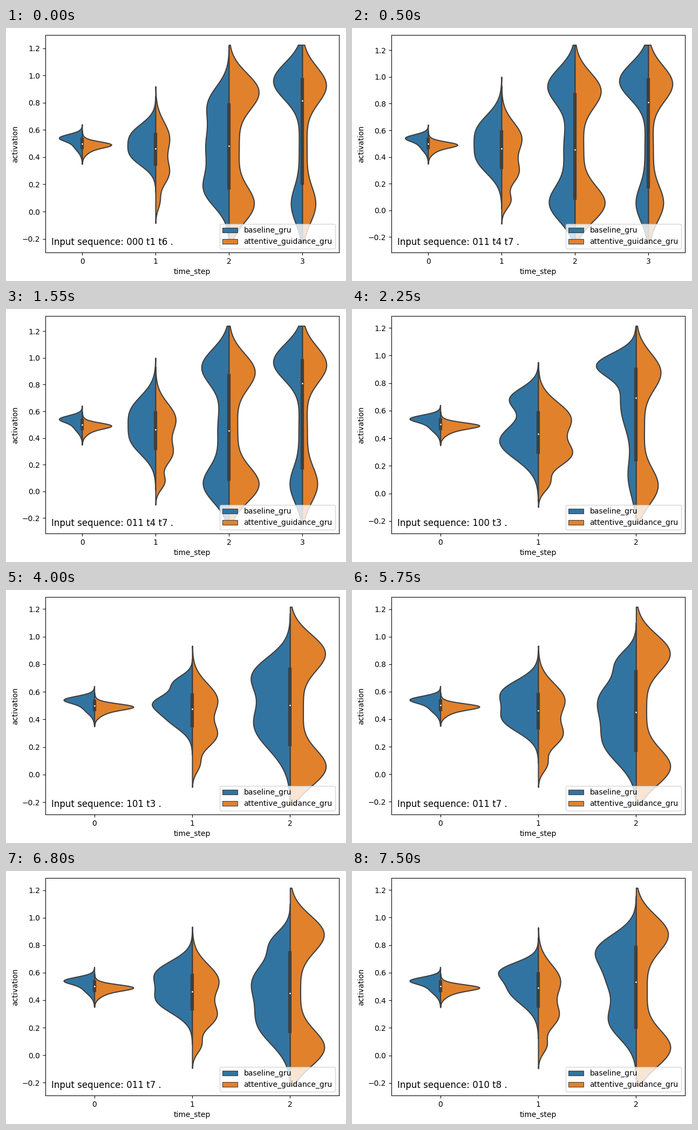
Animation, 630 px wide and 470 px high, one loop 8000 ms. Source, as a matplotlib script:

```python
import matplotlib.pyplot as plt
import numpy as np
from matplotlib.animation import FuncAnimation
from matplotlib.patches import Patch

W, H, DPI = 630, 470, 100
LEFT, RIGHT, TOP, BOTTOM = 73, 617, 13, 417
BLUE, ORANGE, GRAY = "#3274a1", "#e1812c", "#3f3f3f"
HALF_WIDTH = 0.4
INTERVAL, FRAMES = 250, 32

# A violin half is a sum of bell curves: (center, spread, height), height 1 = full width.
# At time step 0 both models look the same for every input.
START = ([(0.545, 0.025, 0.6), (0.495, 0.048, 0.3)],
         [(0.493, 0.021, 0.68), (0.472, 0.04, 0.36)])


def drifting(upper, lower, foot):
    """Half of a violin that begins to sink from the middle."""
    return [(0.54, 0.12, upper), (0.28, 0.09, lower), (0.07, 0.057, foot)]


def split(high, middle, low, top=0.885):
    """Half of a violin with most activations near one or near zero."""
    return [(top, 0.135, high), (0.47, 0.21, middle), (0.05, 0.135, low)]


# (sequence, lowest and highest activation, violins as (left, right))
SCENES = [
    ("000 t1 t6", (-0.228, 1.225), [
        START,
        ([(0.565, 0.085, 0.76), (0.41, 0.08, 0.72)], drifting(0.47, 0.42, 0.12)),
        ([(0.81, 0.125, 0.58), (0.48, 0.18, 0.76), (0.15, 0.125, 0.72)],
         split(0.97, 0.33, 0.81)),
        (split(0.98, 0.11, 0.37, top=0.96), split(0.8, 0.15, 0.43, top=0.93)),
    ]),
    ("011 t4 t7", (-0.241, 1.2395), [
        START,
        ([(0.6, 0.12, 0.8), (0.375, 0.11, 0.72)], drifting(0.68, 0.52, 0.28)),
        (split(0.9, 0.38, 0.83, top=0.935), split(0.85, 0.28, 0.98, top=0.9)),
        (split(0.98, 0.12, 0.41, top=0.97), split(0.81, 0.16, 0.49, top=0.95)),
    ]),
    ("100 t3", (-0.219, 1.215), [
        START,
        ([(0.69, 0.08, 0.68), (0.38, 0.13, 0.99)], drifting(0.83, 0.78, 0.25)),
        ([(0.935, 0.085, 0.87), (0.65, 0.2, 0.4), (0.12, 0.14, 0.2)],
         split(0.6, 0.2, 0.53)),
    ]),
    ("101 t3", (-0.217, 1.215), [
        START,
        ([(0.665, 0.055, 0.45), (0.53, 0.06, 0.7), (0.42, 0.085, 0.62)],
         drifting(0.64, 0.57, 0.16)),
        ([(0.73, 0.13, 0.86), (0.365, 0.18, 0.92)], split(0.85, 0.32, 0.87)),
    ]),
    ("011 t7", (-0.222, 1.218), [
        START,
        ([(0.6, 0.09, 0.86), (0.4, 0.095, 0.86)], drifting(0.67, 0.56, 0.2)),
        ([(0.83, 0.085, 0.36), (0.55, 0.15, 0.9), (0.225, 0.15, 0.77)],
         split(0.83, 0.25, 0.84)),
    ]),
    ("010 t8", (-0.219, 1.215), [
        START,
        ([(0.622, 0.06, 0.62), (0.485, 0.11, 0.76)], drifting(0.56, 0.47, 0.19)),
        ([(0.77, 0.115, 0.93), (0.54, 0.12, 0.6), (0.25, 0.13, 0.68)],
         split(0.78, 0.265, 0.84)),
    ]),
]

fig = plt.figure(figsize=(W / DPI, H / DPI), dpi=DPI, facecolor="white")
ax = fig.add_axes([LEFT / W, 1 - BOTTOM / H, (RIGHT - LEFT) / W, (BOTTOM - TOP) / H])
handles = [Patch(facecolor=color, edgecolor=GRAY, linewidth=0.75, label=label)
           for color, label in ((BLUE, "baseline_gru"), (ORANGE, "attentive_guidance_gru"))]


def density(bumps, y):
    return sum(h * np.exp(-((y - c) / s) ** 2 / 2) for c, s, h in bumps)


def draw_violin(x, halves, y):
    mass = 0
    for bumps, side, color in zip(halves, (-1, 1), (BLUE, ORANGE)):
        width = density(bumps, y)
        mass = mass + width / width.sum()
        seen = width > 0.003
        ax.fill_betweenx(y[seen], x, x + side * HALF_WIDTH * width[seen],
                         facecolor=color, edgecolor=GRAY, linewidth=1.5)
    # The box spans the quartiles of both halves together.
    share = np.cumsum(mass) / mass.sum()
    lower, median, upper = np.interp([0.25, 0.5, 0.75], share, y)
    ax.plot([x, x], [lower, upper], color=GRAY, linewidth=4.5)
    ax.scatter(x, median, s=9, color="white", edgecolor=GRAY, linewidth=1, zorder=3)


def draw(frame):
    # The plot changes every seven ticks, the first one after two.
    sequence, (low, high), violins = SCENES[(frame + 5) // 7]
    ax.clear()
    y = np.linspace(low, high, 600)
    for x, halves in enumerate(violins):
        draw_violin(x, halves, y)
    margin = 0.05 * (high - low)
    ax.set_xticks(range(len(violins)))
    ax.set_yticks(np.arange(-1, 7) / 5)
    ax.set_xlim(-0.5, len(violins) - 0.5)
    ax.set_ylim(low - margin, high + margin)
    ax.set_xlabel("time_step")
    ax.set_ylabel("activation")
    ax.text(0.02, 0.035, f"Input sequence: {sequence} .", fontsize=12, transform=ax.transAxes)
    ax.legend(handles=handles, loc="lower right")
    return []


anim = FuncAnimation(fig, draw, frames=FRAMES, init_func=lambda: [], interval=INTERVAL,
                     repeat=True, repeat_delay=0)
plt.show()
```
